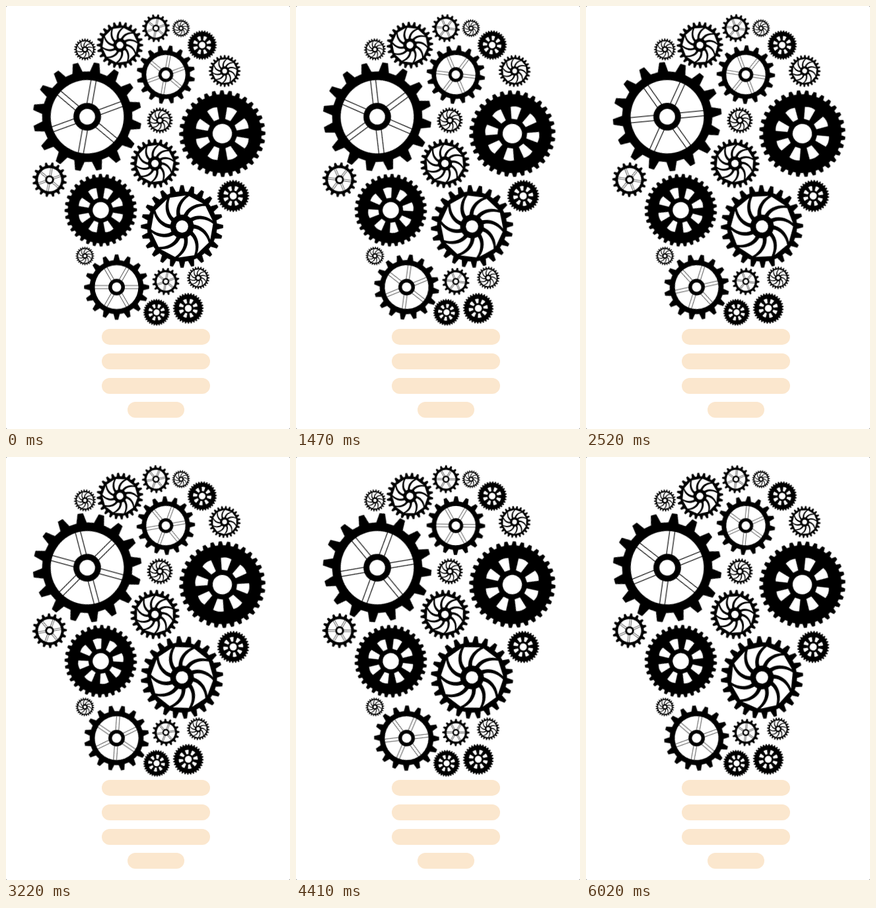
Write an HTML page that moves like this. It is 430 px wide and 638 px high and loops after 6.09 s.

```html
<!DOCTYPE html>
<html lang="en">
<head>
<meta charset="utf-8">
<title>Gear bulb</title>
<style>
  html, body { margin: 0; width: 100%; height: 100%; overflow: hidden; background: #666; }
  svg { display: block; width: 430px; height: 638px; background: #fff; border-radius: 2px; }
  .bar { fill: #fbe7ce; }
  .turn { animation: turn 6.09s steps(87) infinite; }
  .hole { fill: #fff; }
  .spoke { stroke: #000; }
  @keyframes turn {
    from { transform: rotate(var(--from)); }
    to { transform: rotate(var(--to)); }
  }
</style>
</head>
<body>
<svg id="stage" viewBox="0 0 430 638">
  <rect class="bar" x="145" y="487" width="164" height="24" rx="12"/>
  <rect class="bar" x="145" y="524" width="164" height="24" rx="12"/>
  <rect class="bar" x="145" y="561" width="164" height="24" rx="12"/>
  <rect class="bar" x="184" y="597" width="86" height="24" rx="12"/>
</svg>
<script>
  // Shapes are drawn at radius 100; angles are clockwise degrees from the top.
  const polar = (r, deg) => {
    const a = deg * Math.PI / 180;
    return [(r * Math.sin(a)).toFixed(2), (-r * Math.cos(a)).toFixed(2)];
  };
  const white = 'class="hole"';
  const path = (points, attrs = '') => `<path d="M${points.join('L')}Z" ${attrs}/>`;
  const disc = (r, attrs = '') => `<circle r="${r}" ${attrs}/>`;
  const ring = (n, draw) => Array.from({ length: n }, (_, i) => draw(i * 360 / n));

  // base and tip are half widths as a share of the tooth pitch.
  function rim(count, root, base, tip) {
    const pitch = 360 / count;
    const points = ring(count, a => [
      polar(root, a - base * pitch), polar(100, a - tip * pitch),
      polar(100, a + tip * pitch), polar(root, a + base * pitch)]);
    return path(points.flat(), 'stroke="#000" stroke-linejoin="round"');
  }

  function spoked(radius) {
    const width = Math.max(1.4, 60 / radius);
    const spokes = ring(6, a => `<path class="spoke" stroke-width="${width}"
      transform="rotate(${a})" d="M-4.8-22V-68M4.8-22V-68"/>`);
    return rim(16, 83, .28, .12) + disc(67.5, white) + spokes.join('') +
      disc(25.5) + disc(14.5, white);
  }

  function heavy() {
    const wedges = ring(8, a =>
      `<path ${white} transform="rotate(${a})" d="M-6.5-34L-12.5-61Q0-66 12.5-61L6.5-34Z"/>`);
    return rim(32, 91, .31, .16) + wedges.join('') + disc(22.5, white);
  }

  function bladed() {
    const petals = ring(10, a => {
      const left = [], right = [];
      for (let u = 0; u <= 1; u += .125) {
        const r = 29 + 47 * u, mid = a + 28 * u ** 1.3, half = 8 + 7 * Math.sqrt(u);
        left.push(polar(r, mid - half));
        right.unshift(polar(r, mid + half));
      }
      return path(left.concat(right), white);
    });
    return rim(24, 85, .32, .13) + petals.join('') + disc(25) + disc(15, white);
  }

  // Each kind: start angle, degrees per loop, whether neighbours counter-rotate,
  // and its gears as x, y, radius with an optional start and turn of their own.
  const kinds = [
    { draw: spoked, start: 10, turn: 360, gears: [
      [123, 167, 82, 10, 180], [167.5, 424, 49, 90, 405], [242, 103.5, 44],
      [227, 33.5, 21], [66, 262, 26], [242, 415.5, 20.5]] },
    { draw: heavy, start: 22, turn: 315, counter: true, gears: [
      [327.5, 192.5, 65], [143.5, 308, 54.5], [297, 59, 22],
      [344, 286.5, 24], [228, 462, 20], [276, 456, 23]] },
    { draw: bladed, start: 0, turn: 360, counter: true, gears: [
      [266.5, 332.5, 62], [225.5, 237.5, 37], [172.5, 59, 35],
      [331, 98, 24], [233, 172.5, 19.5], [291, 410, 17],
      [119.5, 65.5, 16.5], [119.5, 377, 14], [265, 33.5, 13.5]] }
  ];

  const markup = kinds.flatMap(kind => kind.gears.map(
    ([x, y, r, start = kind.start, turn = kind.turn], i) => {
      const end = start + (kind.counter && i % 2 ? -turn : turn);
      return `<g transform="translate(${x} ${y}) scale(${r / 100})">
        <g class="turn" style="--from:${start}deg;--to:${end}deg">${kind.draw(r)}</g>
      </g>`;
    }));
  document.getElementById('stage').insertAdjacentHTML('beforeend', markup.join(''));
</script>
</body>
</html>
```
